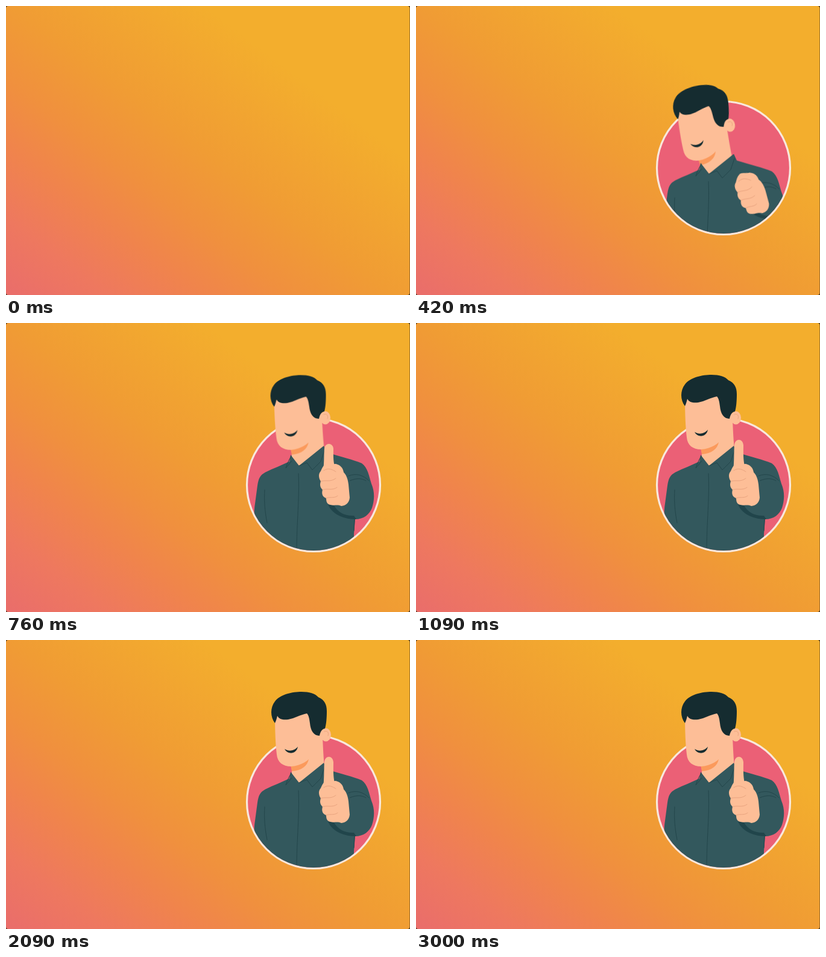
An HTML page that plays this animation: 670 px wide and 480 px high, repeating every 3.03 s.

```html
<!DOCTYPE html>
<html lang="en">
<head>
<meta charset="utf-8">
<title>Thumbs up</title>
<style>
html, body { margin: 0; width: 100%; height: 100%; overflow: hidden; background: #4b3a22; }
svg { display: block; width: 670px; height: 480px; }

.skin { fill: #fdbe97; }
.dark { fill: #152c30; }
.shirt { fill: #33585d; }
.shade { fill: #21454b; }
.seam { fill: none; stroke: #23464b; stroke-width: 1; stroke-linecap: round; stroke-linejoin: round; }
.fold { fill: none; stroke: #e9a480; stroke-width: 1; stroke-linecap: round; }

.badge, .man, .head, .hand, .cuff, .thumb { animation: 3030ms linear infinite both; }
.badge { transform-origin: 510px 269px; animation-name: pop; }
.man { animation-name: rise; }
.head { transform-origin: 490px 225px; animation-name: nod; }
.hand { transform-origin: 545px 268px; animation-name: swing; }
.cuff { animation-name: follow; }
.thumb { transform-origin: 536px 240px; animation-name: extend; }

@keyframes pop {
  0%, .6% { transform: scale(0); animation-timing-function: cubic-bezier(.25, .5, .5, 1); }
  7.9% { transform: scale(1.1); animation-timing-function: ease-in-out; }
  13.8%, 100% { transform: none; }
}
@keyframes rise {
  0%, 3.5% { transform: translateY(300px); animation-timing-function: cubic-bezier(.25, .3, .6, .8); }
  13.86% { transform: translateY(42px); animation-timing-function: cubic-bezier(.3, .42, .6, .85); }
  18.15% { transform: translateY(6px); animation-timing-function: ease-out; }
  21.1% { transform: translateY(-3px); animation-timing-function: ease-in-out; }
  25%, 100% { transform: none; }
}
@keyframes nod {
  0%, 4% { transform: translate(-4px, 4px) rotate(-12deg); }
  13.86% { transform: translate(-2px, 3px) rotate(-6.5deg); animation-timing-function: cubic-bezier(.3, .4, .5, .9); }
  25.08% { transform: translate(0, .5px) rotate(-.8deg); animation-timing-function: ease-out; }
  32%, 100% { transform: none; }
}
@keyframes swing {
  0%, 5% { transform: translate(20px, 6px) rotate(-18deg); }
  13.86% { transform: translate(12px, 1px) rotate(-10deg); animation-timing-function: cubic-bezier(.3, .4, .5, 1); }
  25%, 100% { transform: none; }
}
@keyframes follow {
  0%, 13.86% { transform: translate(12px, -13px); animation-timing-function: cubic-bezier(.3, .4, .5, 1); }
  25%, 100% { transform: none; }
}
@keyframes extend {
  0%, 14.5% { transform: scaleY(0); animation-timing-function: cubic-bezier(.3, .4, .5, .9); }
  25.08% { transform: scaleY(.85); animation-timing-function: ease-out; }
  32%, 100% { transform: none; }
}
</style>
</head>
<body>
<svg viewBox="0 0 670 480">
  <defs>
    <linearGradient id="glow" gradientUnits="userSpaceOnUse" x1="330" y1="0" x2="-16" y2="456">
      <stop offset="0" stop-color="#f3ae2d"/>
      <stop offset=".34" stop-color="#f09c34"/>
      <stop offset=".52" stop-color="#f0903e"/>
      <stop offset=".67" stop-color="#f0844c"/>
      <stop offset=".84" stop-color="#ee785f"/>
      <stop offset="1" stop-color="#ea6e6a"/>
    </linearGradient>
    <!-- open at the top, round at the bottom -->
    <clipPath id="pocket"><path d="M401-20V269A109 109 0 0 0 619 269V-20Z"/></clipPath>
  </defs>

  <rect width="669.5" height="480" rx="4" fill="url(#glow)"/>

  <g class="badge">
    <circle cx="510" cy="269" r="110.5" fill="#eb6076" stroke="#f9e8dc" stroke-width="3.2"/>
  </g>

  <g clip-path="url(#pocket)">
    <g class="man">
      <g class="head">
        <path class="skin" d="M474 200V232L486 252L530 228C527 205 526 185 525 160L490 150Z"/>
        <path fill="#fb9a5c" d="M472 208C486 208 496 204 502 198C500 209 490 217 474 218Z"/>
        <path class="skin" d="M446 124C446 150 447 175 449 190C450 203 459 210 473 210C490 209 502 200 508 190L525 168V120L490 100Z"/>
        <ellipse class="skin" cx="530.5" cy="157.500" rx="8.500" ry="11"/>
        <path class="fold" d="M528 152C533 150 536 154 534 159"/>
        <path class="dark" d="M446 138C438 128 438 112 446 102C455 90 475 86 490 86C503 86 513 89 518 95C528 99 532 107 532 118C532 130 531 140 529 147C523 148 521 154 520 159C510 159 505 150 504 138C503 130 502 125 499 122C488 124 479 130 468 132C460 133 453 132 450 126C449 130 448 134 446 138Z"/>
        <path class="dark" d="M462 181C468 185 478 185 484 177C482 190 467 191 462 181Z"/>
      </g>

      <path class="shirt" d="M472 219L486 237L527 204L532 215C555 222 576 227 590 233C600 240 602 254 606 267C612 281 611 295 607 307C603 318 593 326 579 326L577 350V430H430L414 340C411 328 411 312 413 300L417 270C419 258 421 253 430 248C444 241 458 236 470 230Z"/>
      <path class="seam" d="M473 221C469 228 466 234 464 241L474 229M486 237L499 232L508 244L522 230L528 212M485 250C487 290 482 330 482 382M429 277C428 295 429 312 433 332M568 254C580 249 592 252 602 262M570 262C582 257 590 258 597 262M578 326L577 345"/>

      <path class="cuff shade" d="M534 301C539 315 556 326 581 326L577 320C562 321 550 314 544 303Z"/>

      <g class="hand">
        <path class="thumb skin" d="M526 245C528 230 527 216 528 203C529 191 542 191 543 203C543 216 542 229 547 245Z"/>
        <path class="skin" d="M530 234C535 231 542 235 547 234C555 236 559 241 560 248C565 253 567 260 568 268L570 290C569 299 564 303 556 304C550 301 544 304 538 302C532 301 531 296 531 291C525 289 523 284 525 277C521 273 520 269 522 263C518 257 518 250 522 246C524 241 526 237 530 234Z"/>
        <path class="fold" d="M522 263C530 260 538 265 547 258M525 277C533 274 541 279 549 273M531 291C537 288 544 292 550 287M527 245C534 240 541 243 547 247"/>
      </g>
    </g>
  </g>
</svg>
</body>
</html>
```
